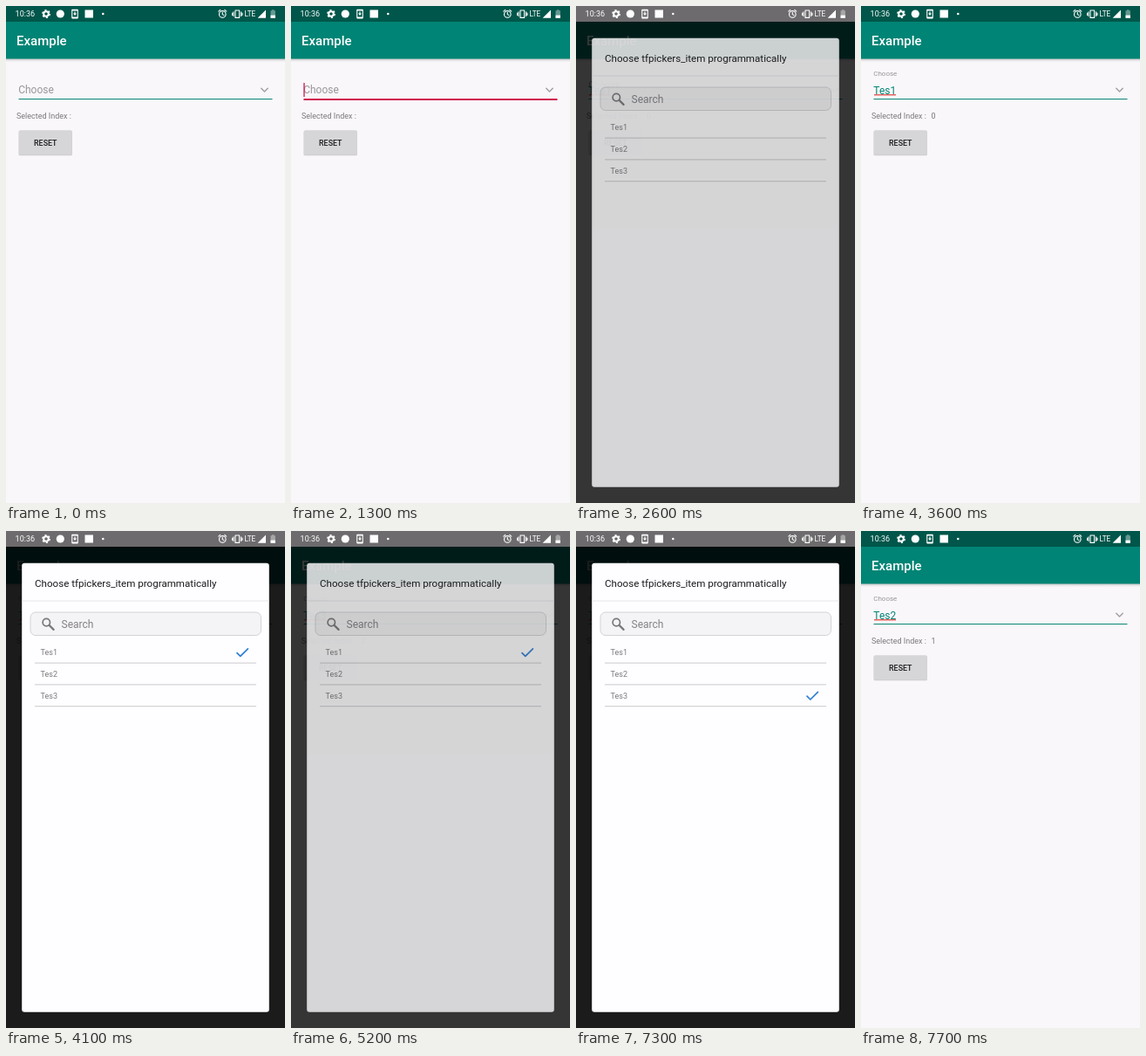
Animation, 320 px wide and 569 px high, one loop 8000 ms. Source, as an HTML page:

```html
<!DOCTYPE html>
<html lang="en">
<head>
<meta charset="utf-8">
<title>Spinner dialog</title>
<style>
  html, body { margin: 0; width: 100%; height: 100%; overflow: hidden; background: #f9f7fa; }
  svg { display: block; width: 320px; height: 569px; font-family: Roboto, sans-serif; }
  .line { fill: none; stroke-linecap: round; stroke-linejoin: round; }
</style>
</head>
<body>
<svg viewBox="0 0 320 569">
  <defs>
    <linearGradient id="shade" x2="0" y2="1">
      <stop stop-color="#000" stop-opacity=".2"/>
      <stop offset="1" stop-color="#000" stop-opacity="0"/>
    </linearGradient>
  </defs>

  <g id="app">
    <rect width="320" height="569" fill="#f9f7fa"/>
    <rect y="60" width="320" height="4" fill="url(#shade)"/>
    <rect y="18" width="320" height="42.5" fill="#008475"/>
    <text x="12" y="45" font-size="15" font-weight="500" fill="#fff">Example</text>

    <text id="hint" font-size="12" fill="#98969a">Choose</text>
    <text id="value" x="14.3" y="100.5" font-size="12" fill="#008475"></text>
    <rect id="spell" x="15" y="101.2" width="25" height="1.2" fill="#e2403c"/>
    <rect id="cursor" x="14.4" y="88" width="1.3" height="16" fill="#d0174f"/>
    <rect id="rule" x="14.5" y="106" width="291"/>
    <path class="line" d="M292.8 94.3l3.7 3.7 3.7-3.7" stroke="#a5a3a6" stroke-width="1.6"/>

    <text x="12" y="129" font-size="9" fill="#7b797c">Selected Index :</text>
    <text id="index" x="80.6" y="129" font-size="9" fill="#7b797c"></text>
    <rect x="14.5" y="143" width="61.5" height="28.2" rx="1.5" fill="#000" opacity=".16"/>
    <rect x="14.8" y="142.3" width="61" height="27.8" rx="1.5" fill="#d6d5d7"/>
    <text x="45.3" y="159.6" font-size="8.9" font-weight="500" text-anchor="middle" fill="#1d1c1e">RESET</text>
  </g>

  <rect id="dim" y="18" width="320" height="551" fill="#000"/>
  <rect width="320" height="18" fill="#00564a"/>
  <rect id="bar" width="320" height="18" fill="#6d6b6d"/>

  <g fill="#fff">
    <text x="10.6" y="12.3" font-size="9">10:36</text>
    <circle class="line" cx="46" cy="9" r="2.8" stroke="#fff" stroke-width="2"/>
    <circle class="line" cx="46" cy="9" r="4.2" stroke="#fff" stroke-width="1.5" style="stroke-linecap:butt" stroke-dasharray="2.2 2.2"/>
    <circle cx="62.3" cy="9" r="4.6"/>
    <path fill-rule="evenodd" d="M76 3.8h6a.8.8 0 0 1 .8.8v9a.8.8 0 0 1-.8.8h-6a.8.8 0 0 1-.8-.8v-9a.8.8 0 0 1 .8-.8zM76.3 5.6v6.9h5.4V5.6z"/>
    <path d="M78.4 6.5h1.2v2h1.4l-2 2.4-2-2.4h1.4z"/>
    <rect x="90.5" y="4.5" width="9.5" height="9"/>
    <circle cx="111.3" cy="9" r="1.3"/>
    <g class="line" stroke="#fff" stroke-width="1.1">
      <circle cx="248.3" cy="9.4" r="3.8"/>
      <path d="M248.3 7.2v2.4l1.7 1M243.8 6.2l2-1.8M252.8 6.2l-2-1.8"/>
      <path d="M263 5h4.6v8.4H263zM261 6.8v4.8M269.6 6.8v4.8M259.6 8v2.4M271 8v2.4"/>
    </g>
    <text x="273.4" y="12.3" font-size="8.2">LTE</text>
    <path d="M298 4.4v9.4h-9.4z"/>
    <path d="M305 4.2h2.4v1h1.5v8.6h-5.4V5.2h1.5z" opacity=".4"/>
    <path d="M303.5 10.6h5.4v3.2h-5.4z"/>
  </g>

  <g id="dialog">
    <rect x="18.2" y="36.8" width="283.6" height="514" rx="3" fill="#fefdff"/>
    <text x="33" y="64.3" font-size="11.6" fill="#1b1a1c">Choose tfpickers_item programmatically</text>
    <rect x="18.2" y="79.5" width="283.6" height="1" fill="#e7e6e8"/>
    <rect x="28" y="93" width="264.5" height="26.5" rx="6" fill="#f4f3f5" stroke="#d3d2d5"/>
    <g class="line" stroke="#7a787b">
      <circle cx="46.3" cy="104.6" r="4.2" stroke-width="1.7"/>
      <path d="M49.8 108.1l4.8 4.8" stroke-width="2.2"/>
    </g>
    <text x="63.6" y="110.8" font-size="12" fill="#838184">Search</text>
    <g id="rows"></g>
    <path id="check" class="line" d="M265 139.6l3.8 3.8 8.6-8.6" stroke="#2f7fd3" stroke-width="1.7"/>
  </g>
</svg>
<script>
  const LOOP = 8000, STEP = 100, PITCH = 24.8;
  const $ = id => document.getElementById(id);
  const set = (id, attrs) => {
    for (const key in attrs) $(id).setAttribute(key, attrs[key]);
  };
  const clamp = v => Math.max(0, Math.min(1, v));

  // Each visit to the dialog: opening time, fade per step, closing time, row picked.
  const visits = [
    { open: 1500, rate: .2, close: 2600, pick: 0 },
    { open: 3800, rate: .3, close: 5200, pick: 2 },
    { open: 6600, rate: .4, close: 7500, pick: 1 }
  ];
  const focused = [[1300, 2600], [3300, 3600], [6200, 6300]];

  $('rows').innerHTML = [0, 1, 2].map(i => `
    <text x="39.6" y="${142.4 + i * PITCH}" font-size="9" fill="#7b797c">Tes${i + 1}</text>
    <rect x="33" y="${150.6 + i * PITCH}" width="254" height="1" fill="#cbcacc"/>`).join('');

  function dialogAt(t) {
    let alpha = 0, picked = -1, checked = -1;
    for (const v of visits) {
      if (t < v.open) break;
      checked = picked;
      if (t < v.close) {
        alpha = clamp(v.rate * ((t - v.open) / STEP + 1));
      } else {
        alpha = clamp(.8 - .5 * (t - v.close) / STEP);
        picked = v.pick;
      }
    }
    return { alpha, picked, checked };
  }

  function draw(time) {
    const t = Math.floor(time / STEP) * STEP;
    const { alpha, picked, checked } = dialogAt(t);
    const chosen = picked >= 0;
    const focus = focused.some(([from, to]) => t >= from && t < to);

    const lift = chosen ? clamp(.3 + .45 * (t - visits[0].close) / STEP) : 0;
    set('hint', { transform: `translate(14.2 ${100.2 - 20.4 * lift}) scale(${1 - lift / 3})` });
    $('value').textContent = chosen ? 'Tes' + (picked + 1) : '';
    $('index').textContent = chosen ? picked : '';
    set('spell', { opacity: chosen ? 1 : 0 });
    set('cursor', { opacity: focus ? 1 : 0 });
    set('rule', { fill: focus ? '#d0174f' : '#178a7d', height: focus ? 2 : 1.1 });

    set('dim', { opacity: .89 * clamp(alpha * 1.1) });
    set('bar', { opacity: clamp(alpha * 1.25) });
    set('dialog', { opacity: alpha });
    set('check', {
      opacity: checked < 0 ? 0 : 1,
      transform: `translate(0 ${Math.max(checked, 0) * PITCH})`
    });
  }

  const start = performance.now();
  function tick() {
    draw((performance.now() - start) % LOOP);
    requestAnimationFrame(tick);
  }
  tick();
</script>
</body>
</html>
```
